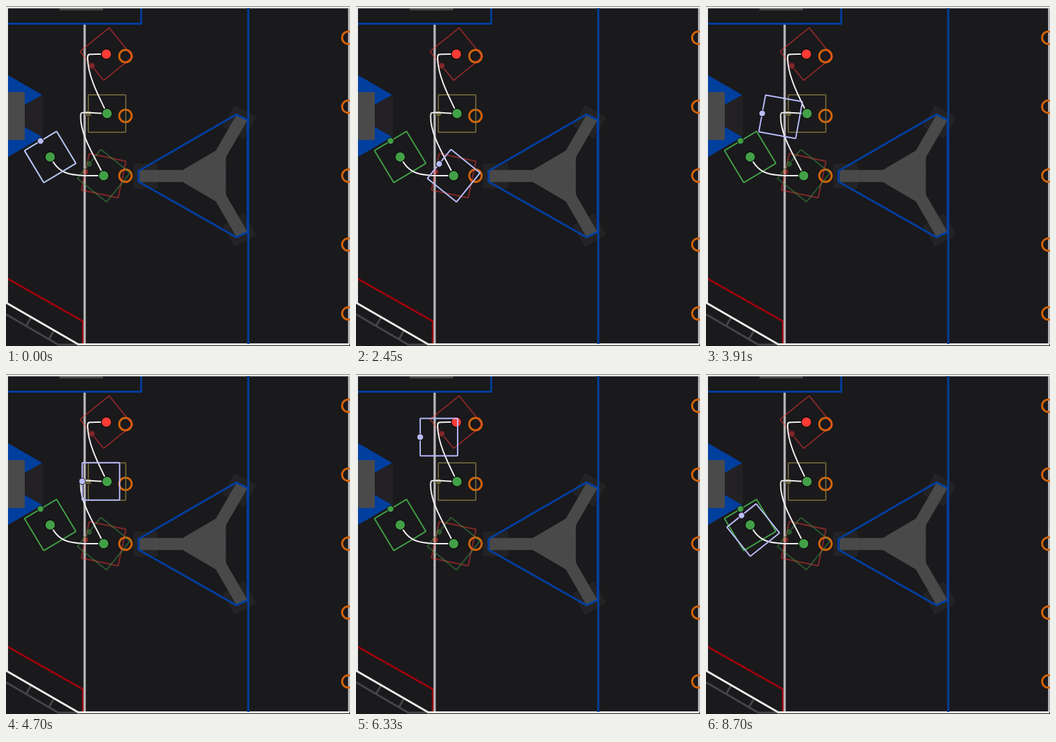
An HTML page for the animation above (8.73 s loop, 514 by 509 pixels).

```html
<!DOCTYPE html>
<html lang="en">
<head>
<meta charset="utf-8">
<title>Robot path preview</title>
<style>
  html, body { margin: 0; width: 100%; height: 100%; overflow: hidden; background: #1a191c; }
  svg { display: block; width: 514px; height: 509px; }
  .line { fill: none; stroke-width: 3; }
  .blue { stroke: #003f9e; }
  .route { fill: none; stroke: #f2f2f2; stroke-width: 2; }
  .ring { fill: none; stroke: #d2640a; stroke-width: 3; }
  .frame { fill: none; stroke: currentColor; stroke-width: 2; }
  .front { fill: currentColor; stroke: #1a191c; stroke-width: 1; }
  .stop { stroke: #0c0c0c; stroke-width: 1.2; }
  .dim { opacity: .45; }
</style>
</head>
<body>
<svg viewBox="0 0 514 509">
  <defs>
    <rect id="foot" x="190" y="236" width="37" height="37" fill="#232224"/>
    <path id="leg" d="M199.500 245.500H264L302 232V277L264 263.500H199.500Z" fill="#4a494a"/>
    <g id="bot">
      <rect class="frame" x="-28" y="-28" width="56" height="56" rx="1"/>
      <circle class="front" cx="28" r="4.800"/>
    </g>
  </defs>

  <!-- field -->
  <rect x="80" y="3" width="65" height="3.500" fill="#4a494a"/>
  <path class="line blue" d="M2 26.500H202V3"/>
  <rect x="28" y="134" width="27" height="62" fill="#232123"/>
  <path d="M3 103.500L54 133L3 162ZM3 167L54 196L3 226Z" fill="#003f9e"/>
  <rect x="3" y="129" width="25" height="71.500" fill="#4b4a4b"/>
  <path class="line" stroke="#9c000b" d="M2 408L115 472V506"/>
  <path class="line" stroke="#b5b3b5" style="stroke-width:3.500" d="M117.500 28V506"/>
  <path class="line" stroke="#454446" d="M0 461.500L78 507H110M37 467L30 479M71 487L64 499"/>
  <path class="line" stroke="#b5b3b5" d="M512.500 3V506"/>
  <path class="line" stroke="#ececec" d="M1.500 444V2H514M513 506.500H108L0 444"/>

  <!-- truss -->
  <use href="#foot"/>
  <use href="#foot" transform="rotate(120 302 254.500)"/>
  <use href="#foot" transform="rotate(240 302 254.500)"/>
  <path d="M264 245.500L313.500 216.500L328.500 225V284L313.500 292.500L264 263.500Z" fill="#4a494a"/>
  <use href="#leg"/>
  <use href="#leg" transform="rotate(120 302 254.500)"/>
  <use href="#leg" transform="rotate(240 302 254.500)"/>
  <path class="line blue" d="M198 247L344 162.500L361 170.500V338.500L344 346L198 263Z"/>
  <path class="line blue" d="M362 3V506"/>

  <g id="rings"></g>
  <g id="ghosts"></g>
  <g id="routes"></g>
  <g id="stops"></g>
  <use id="robot" href="#bot" color="#b9bbfb"/>
</svg>
<script>
const LOOP = 8.73, RESTART = 8.22, JUMP = 8.16;
const GREEN = '#43a047', RED = '#ff3b35';

// keys: [time s, distance px, speed px/s]; turn: distances between which the heading swings
const legs = [
  { d: 'M66 226C81 253 92 254.5 146 254',
    keys: [[-.06, 0, 0], [1.17, 46, 75], [2.42, null, 0]],
    from: 239, to: 192, turn: [2, 44] },
  { d: 'M146 254C134 228 111.5 195 111.5 166C111 156 112 160 151 161',
    keys: [[2.44, 0, 0], [3.52, 71, 80], [3.91, 95.5, 42], [5.165, null, 0]],
    from: 219, to: 180, turn: [0, 130] },
  { d: 'M151 161C140 138 122 105 122 78C122 71 121 72 150 72',
    keys: [[5.165, 0, 0], [5.52, 6.7, 38], [6.33, 72, 70], [7.09, 103, 45], [7.96, null, 0]],
    from: 180, to: 141, turn: [76, 120] }
];

const $ = id => document.getElementById(id);

function add(parent, tag, attrs) {
  const el = document.createElementNS('http://www.w3.org/2000/svg', tag);
  for (const k in attrs) el.setAttribute(k, attrs[k]);
  return $(parent).appendChild(el);
}

const pose = (x, y, angle) => `translate(${x} ${y}) rotate(${angle})`;

function ghost(p, angle, color, dim) {
  add('ghosts', 'use', { href: '#bot', class: dim ? 'dim' : '', color,
    transform: pose(p.x, p.y, angle) });
}

function stop(p, fill) {
  add('stops', 'circle', { class: 'stop', cx: p.x, cy: p.y, r: 7.6, fill });
}

function ring(cx, cy) {
  add('rings', 'circle', { class: 'ring', cx, cy, r: 9.3 });
}

for (const y of [75, 164.5, 254]) ring(178.5, y);
for (let i = 0; i < 5; i++) ring(511.5, 47.5 + i * 103.2);

for (const leg of legs) {
  leg.path = add('routes', 'path', { class: 'route', d: leg.d });
  leg.length = leg.path.getTotalLength();
  leg.keys[leg.keys.length - 1][1] = leg.length;
}
const last = legs[legs.length - 1];
for (const leg of legs) ghost(leg.path.getPointAtLength(leg.length), leg.to, RED, true);
legs.forEach((leg, i) => {
  const start = leg.path.getPointAtLength(0);
  ghost(start, leg.from, GREEN, i > 0);
  stop(start, GREEN);
});
stop(last.path.getPointAtLength(last.length), RED);

const clamp = (v, a, b) => Math.min(b, Math.max(a, v));

// Cubic Hermite through the keys
function distance(keys, t) {
  t = clamp(t, keys[0][0], keys[keys.length - 1][0]);
  const i = keys.findIndex((k, n) => n > 0 && t <= k[0]);
  const [t0, s0, v0] = keys[i - 1], [t1, s1, v1] = keys[i];
  const h = t1 - t0, u = (t - t0) / h, w = 1 - u;
  return s0 * (1 + 2 * u) * w * w + s1 * u * u * (3 - 2 * u) + h * u * w * (v0 * w - v1 * u);
}

function draw(now) {
  let t = now / 1000 % LOOP;
  if (t >= JUMP) t -= RESTART;
  const leg = t < legs[1].keys[0][0] ? legs[0] : t < legs[2].keys[0][0] ? legs[1] : legs[2];
  const s = distance(leg.keys, t);
  const p = leg.path.getPointAtLength(s);
  const [a, b] = leg.turn;
  const angle = leg.from + (leg.to - leg.from) * clamp((s - a) / (b - a), 0, 1);
  $('robot').setAttribute('transform', pose(p.x, p.y, angle));
}

const begin = performance.now();
function tick() {
  draw(performance.now() - begin);
  requestAnimationFrame(tick);
}
tick();
</script>
</body>
</html>
```
